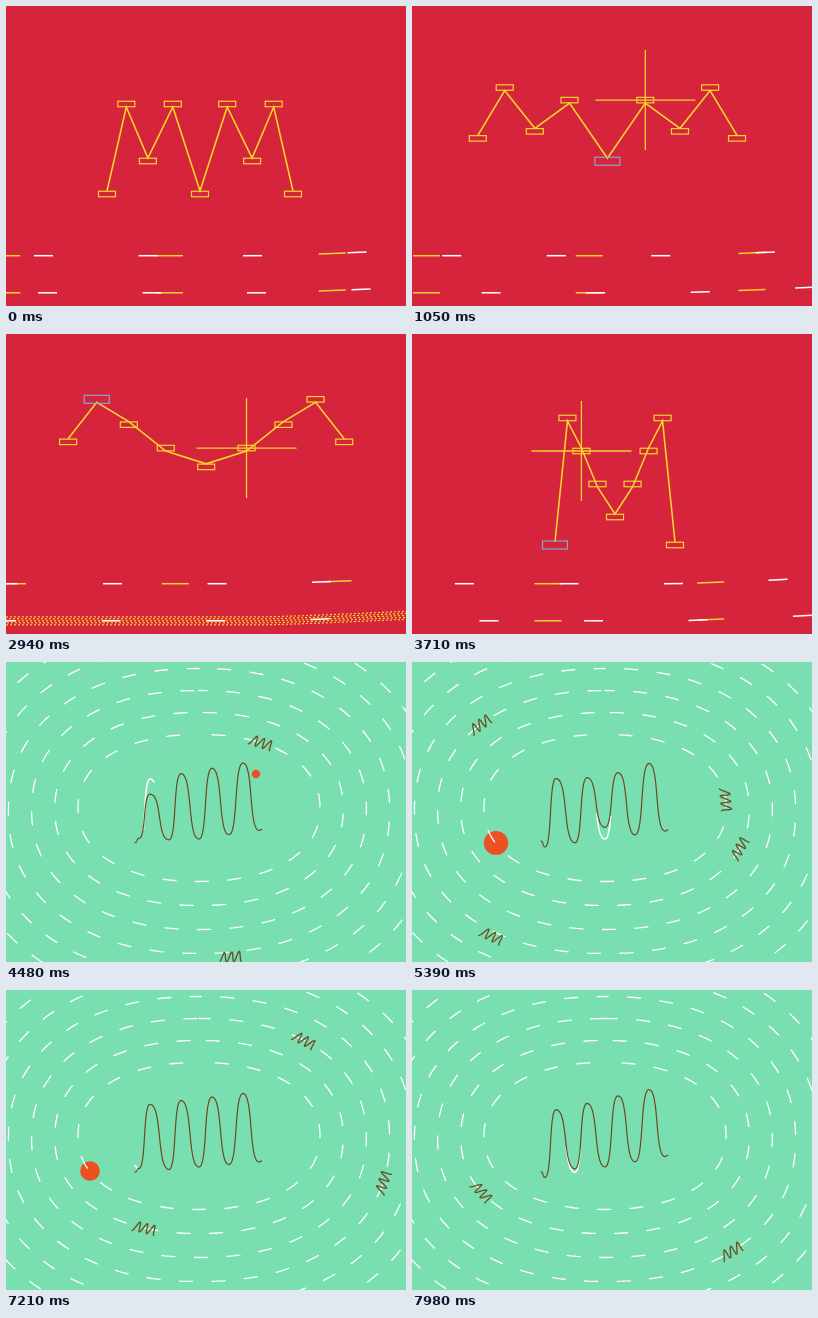
Write an HTML page with a canvas that moves like this. It is 400 px wide and 300 px high and loops after 8 s.

```html
<!DOCTYPE html>
<html lang="en">
<head>
<meta charset="utf-8">
<title>Zigzag and squiggle</title>
<style>
  html, body { margin: 0; width: 100%; height: 100%; overflow: hidden; }
  canvas { display: block; }
</style>
</head>
<body>
<canvas id="stage" width="400" height="300"></canvas>
<script>
const ctx = document.getElementById('stage').getContext('2d');
const LOOP = 8000, STEP = 70, GREEN_START = 4270;
const RED = '#d5243b', YELLOW = '#f4d52b', BLUE = '#7fa9c9', WHITE = '#fff';
const GREEN = '#79dfb0', BROWN = '#6d4a1f', ORANGE = '#ec5023';
const { PI, abs, sin, cos, sign, floor, max, min } = Math;

const mix = (a, b, k) => a + (b - a) * k;
const ease = (t, from, to) => {
  const k = min(1, max(0, (t - from) / (to - from)));
  return k * k * (3 - 2 * k);
};
const series = (count, make) => Array.from({ length: count }, (_, i) => make(i));

function polyline(points, color, width = 1.3) {
  ctx.beginPath();
  points.forEach(([x, y]) => ctx.lineTo(x, y));
  ctx.strokeStyle = color;
  ctx.lineWidth = width;
  ctx.stroke();
}

function fillStage(color) {
  ctx.fillStyle = color;
  ctx.fillRect(0, 0, 400, 300);
}

// Red scene: a zigzag with handles above a road

// Double M, wide arc and single M; v runs from -1 to 1 over the nine vertices.
function zigzag(t) {
  const toArc = ease(t, 850, 1350), toSingle = ease(t, 2600, 3350);
  const morph = (double, arc, single) => mix(mix(double, arc, toArc), single, toSingle);
  return series(9, i => {
    const v = (i - 4) / 4, d = v + 0.06 * sin(PI * v);
    const doubleY = i % 2 ? 98 : i % 4 ? 155 : 188;
    const arcY = 95 - 65 * abs(d) ** 1.7;
    const singleY = abs(v) === 1 ? 211 : 183 - 132 * abs(v);
    return [
      morph(194, 198, 203) + d * morph(93, 197, 60),
      morph(doubleY, arcY, singleY)
    ];
  });
}

const TURN = 630;
const ROADS = [
  { y: 249.7, start: 28, speed: 0.2012, tickTurn: 3 },
  { y: 286.8, start: 32, speed: 0.2349, tickTurn: 4 }
];

function dashes(y, start, period, length, color, width = 1.5) {
  const height = x => y - 5.5 * max(0, (x - 260) / 140) ** 1.2;
  for (let x = start % period - period; x < 400; x += period) {
    polyline([[x, height(x)], [x + length, height(x + length)]], color, width);
  }
}

function drawRoad({ y, start, speed, tickTurn }, t) {
  const yellowStart = 150 + 0.168 * t;
  if (floor(t / TURN) === tickTurn) {
    for (let dy = -4; dy <= 4; dy += 2) dashes(y + dy, yellowStart + dy % 4 / 2, 4, 2, YELLOW, 1.2);
  } else {
    dashes(y, yellowStart, 162.7, 27, YELLOW);
  }
  dashes(y, start + speed * t, 104.5, 19, WHITE);
}

function drawCross([x, y], color) {
  polyline([[x - 50, y], [x + 50, y]], color);
  polyline([[x, y - 50], [x, y + 50]], color);
}

function drawRed(t) {
  fillStage(RED);
  ROADS.forEach(road => drawRoad(road, t));

  // Each turn rests, then a cross and a large handle hop to other vertices.
  const turn = floor(t / TURN), active = t % TURN >= 210;
  const crossed = active ? (6 * turn + 8) % 9 : -1;
  const selected = active ? (8 * turn + 5) % 9 : -1;
  const crossColor = turn % 3 ? YELLOW : BLUE;

  const points = zigzag(t);
  polyline(points.map(([x, y], i) => [x, y + (i % 2 ? 3 : -3)]), YELLOW, 1.6);
  points.forEach(([x, y], i) => {
    const [w, h] = i === selected ? [25, 8] : [17, 5.5];
    ctx.lineWidth = 1.2;
    ctx.strokeStyle = i === selected ? BLUE : i === crossed ? crossColor : YELLOW;
    ctx.strokeRect(x - w / 2, y - h / 2, w, h);
  });
  if (active) drawCross(points[crossed], crossColor);
}

// Green scene: a squiggle inside dashed rings

// Turning points of the squiggle; a dent of the given depth follows the head.
function squiggle(t, head, depth) {
  const tilt = 0.09 * cos(2 * PI * (t - 6440) / 3080);
  return series(11, i => {
    const peak = i % 2 === 0, k = floor((i - 1) / 2);
    let x = peak ? 144 + 31 * k : 133 + 30 * k;
    let y = peak ? 114 - 3.5 * k : 182 - 2.5 * k;
    if (i === 0) [x, y] = [129, 176];
    if (i === 10) [x, y] = [256, 171];
    const dent = depth * Math.exp(-((i - head) ** 2));
    return [x, y + tilt * (x - 193) + (peak ? dent : -dent)];
  });
}

// Curve with level tangents at each turning point, between positions a and b.
function wave(turns, a, b) {
  const curve = [];
  for (let u = a; u <= b; u += 0.05) {
    const i = min(turns.length - 2, floor(u)), k = u - i, r = 1 - k;
    const [x0, y0] = turns[i], [x1, y1] = turns[i + 1], reach = 0.65 * (x1 - x0);
    curve.push([
      r ** 3 * x0 + 3 * r * r * k * (x0 + reach) + 3 * r * k * k * (x1 - reach) + k ** 3 * x1,
      mix(y0, y1, ease(k, 0, 1))
    ]);
  }
  return curve;
}

function drawSquiggle(t) {
  const head = (t - 3990) % 3150 / 280;
  const fade = 1 - 0.8 * (t - GREEN_START) / (LOOP - GREEN_START);
  const depth = 17 * fade * max(0, 1 - (head / 9) ** 4);
  const from = max(0, head - 0.42), to = min(10, head + 0.42);
  polyline(wave(squiggle(t, head, 0), from, to), WHITE, 1.5);
  polyline(wave(squiggle(t, head, depth), 0, 10), BROWN, 1.2);
}

// Point of a slightly squared ellipse, clockwise with 0 at the right.
function ringPoint(ring, degrees) {
  const a = degrees * PI / 180;
  const bulge = v => sign(v) * abs(v) ** (2 / 2.2);
  return [
    193 + (121 + 23.2 * ring) * bulge(cos(a)),
    146 + ring + (73.5 + 23 * ring) * bulge(sin(a))
  ];
}

function drawRings(t) {
  ctx.setLineDash([13, 19.5]);
  for (let ring = 0; ring < 6; ring++) {
    ctx.lineDashOffset = 19.5 + ring * 9 - (t - GREEN_START) / 900;
    polyline(series(181, i => ringPoint(ring, i * 2 - 90)), WHITE);
  }
  ctx.setLineDash([]);
}

const LIFETIME = 3100;
const TRAVELLERS = [
  { ring: 0, angle: -97, born: 3900 },
  { ring: 1, angle: -2, born: 4900 },
  { ring: 2, angle: 197, born: 4800 },
  { ring: 3.2, angle: 56, born: 3900 },
  { ring: 3, angle: 6, born: 7000 }
];
const RIPPLE = series(61, i => {
  const y = 5 * cos(i / 10 * PI);
  return [i * 0.37 - 11 - 0.25 * y, y];
});

function drawTraveller({ ring, angle, born }, t) {
  const age = t - born;
  if (age < 0 || age > LIFETIME) return;
  const place = angle + age / 1000 * (45 + 17 * 0.2 ** ring);
  const [x, y] = ringPoint(ring, place), [nextX, nextY] = ringPoint(ring, place + 1);
  ctx.save();
  ctx.translate(x, y);
  ctx.rotate(Math.atan((nextY - y) / (nextX - x)));
  polyline(RIPPLE, BROWN);
  ctx.restore();
}

function drawBall(t) {
  const k = ease(t, 4480, 5390);
  const radius = 14 * max(0, sin(PI * (t - GREEN_START) / 3700)) ** 0.7;
  ctx.fillStyle = ORANGE;
  ctx.beginPath();
  ctx.arc(mix(250, 84, k), mix(112, 181, k), radius, 0, 2 * PI);
  ctx.fill();
}

function drawGreen(t) {
  fillStage(GREEN);
  drawBall(t);
  drawRings(t);
  TRAVELLERS.forEach(traveller => drawTraveller(traveller, t));
  drawSquiggle(t);
}

function frame(now) {
  const t = floor(now % LOOP / STEP) * STEP;
  ctx.lineCap = t < GREEN_START ? 'butt' : 'round';
  (t < GREEN_START ? drawRed : drawGreen)(t);
  requestAnimationFrame(frame);
}
frame(performance.now());
</script>
</body>
</html>
```
